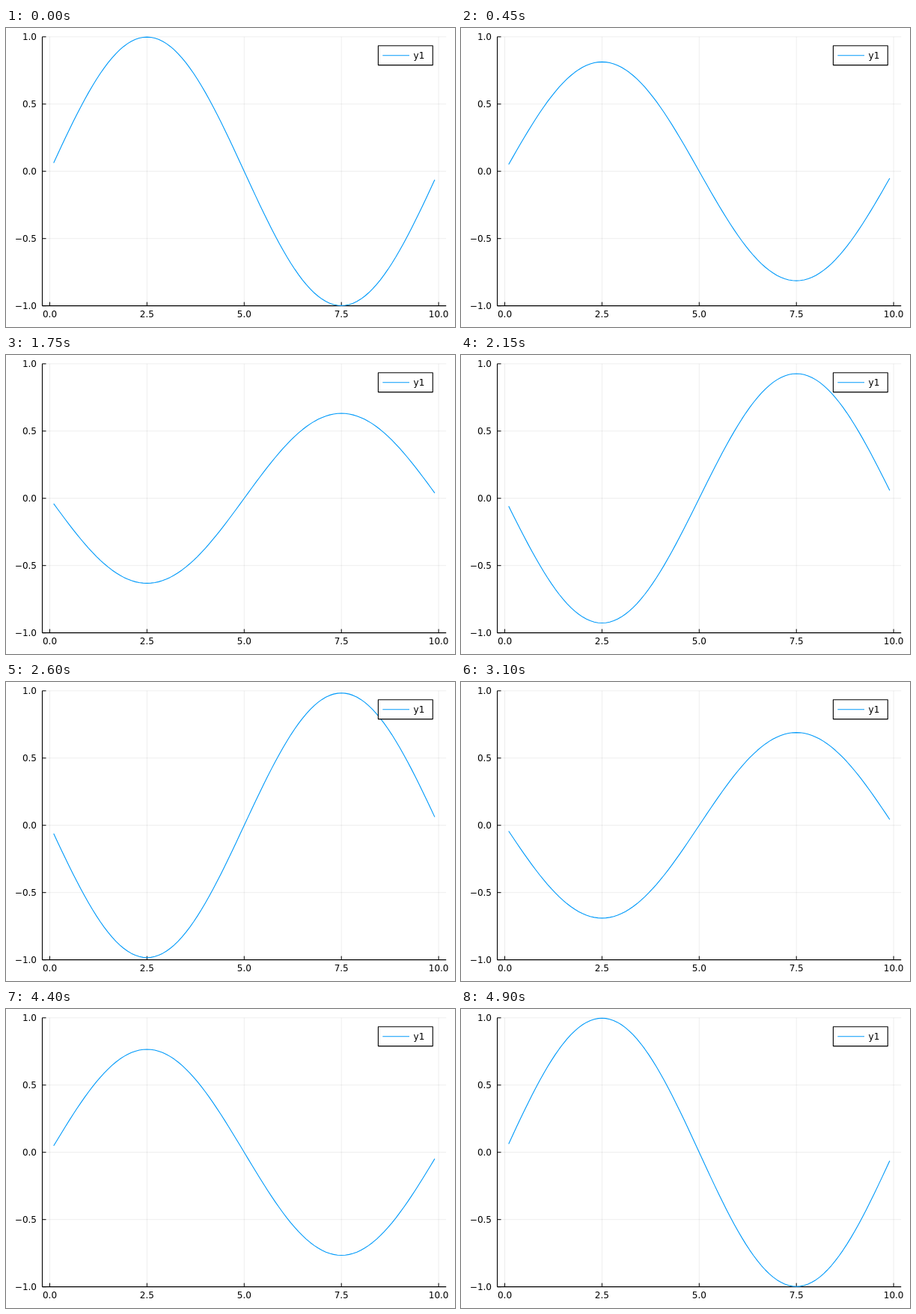
Recreate the animation shown at these times as an HTML page with a canvas. Size 600x400 px, loop 4950 ms.

```html
<!DOCTYPE html>
<html>
<head>
<meta charset="utf-8">
<style>
html, body { margin: 0; width: 100%; height: 100%; overflow: hidden; background: #fff; }
canvas { display: block; }
</style>
</head>
<body>
<canvas id="stage" width="600" height="400"></canvas>
<script>
const ctx = document.getElementById('stage').getContext('2d');
const STEP = 50, STEPS = 99;
const BLUE = '#009afa';
const box = { left: 48.5, right: 588.2, top: 11.8, bottom: 371.65 };
const px = x => 58.5 + x * 51.96;
const py = y => 191.73 - y * 179.92;
const xTicks = [0, 2.5, 5, 7.5, 10];
const yTicks = [-1, -0.5, 0, 0.5, 1];
const label = v => v.toFixed(1).replace('-', '\u2212');

function line(x1, y1, x2, y2, color, width = 1) {
  ctx.strokeStyle = color;
  ctx.lineWidth = width;
  ctx.beginPath();
  ctx.moveTo(x1, y1);
  ctx.lineTo(x2, y2);
  ctx.stroke();
}

function text(str, x, y, align) {
  ctx.fillStyle = '#000';
  ctx.textAlign = align;
  ctx.fillText(str, x, y);
}

function drawAxes() {
  const grid = 'rgba(0,0,0,0.07)';
  for (const x of xTicks) line(px(x), box.top, px(x), box.bottom, grid);
  for (const y of yTicks) line(box.left, py(y), box.right, py(y), grid);
  line(box.left, box.bottom, box.right, box.bottom, '#000', 1.1);
  line(box.left, box.top, box.left, box.bottom, '#000', 1.1);
  for (const x of xTicks) {
    line(px(x), box.bottom, px(x), box.bottom - 5, '#000');
    text(label(x), px(x), 387.4, 'center');
  }
  for (const y of yTicks) {
    line(box.left, py(y), box.left + 5, py(y), '#000');
    text(label(y), 41, py(y) + 4.4, 'right');
  }
}

function drawWave(amplitude) {
  ctx.strokeStyle = BLUE;
  ctx.lineWidth = 1.1;
  ctx.lineJoin = 'round';
  ctx.beginPath();
  for (let i = 1; i < 100; i++) {
    const x = i / 10;
    ctx.lineTo(px(x), py(amplitude * Math.sin(Math.PI * x / 5)));
  }
  ctx.stroke();
}

function drawLegend() {
  ctx.fillStyle = '#fff';
  ctx.fillRect(497.4, 23.8, 72.9, 25.8);
  ctx.strokeStyle = '#000';
  ctx.lineWidth = 1.1;
  ctx.strokeRect(497.4, 23.8, 72.9, 25.8);
  line(503.3, 36.7, 539, 36.7, BLUE, 1.1);
  text('y1', 544.6, 41.1, 'left');
}

function render(now) {
  const step = Math.floor(now / STEP) % STEPS;
  ctx.fillStyle = '#fff';
  ctx.fillRect(0, 0, 600, 400);
  ctx.font = '12px "DejaVu Sans", sans-serif';
  drawAxes();
  // Standing wave with a period of 100 steps and a small phase lead.
  drawWave(Math.cos(2 * Math.PI * (step / 100 + 0.0088)));
  drawLegend();
}

let start;
function tick(now) {
  start ??= now;
  render(now - start);
  requestAnimationFrame(tick);
}
render(0);
requestAnimationFrame(tick);
</script>
</body>
</html>
```
